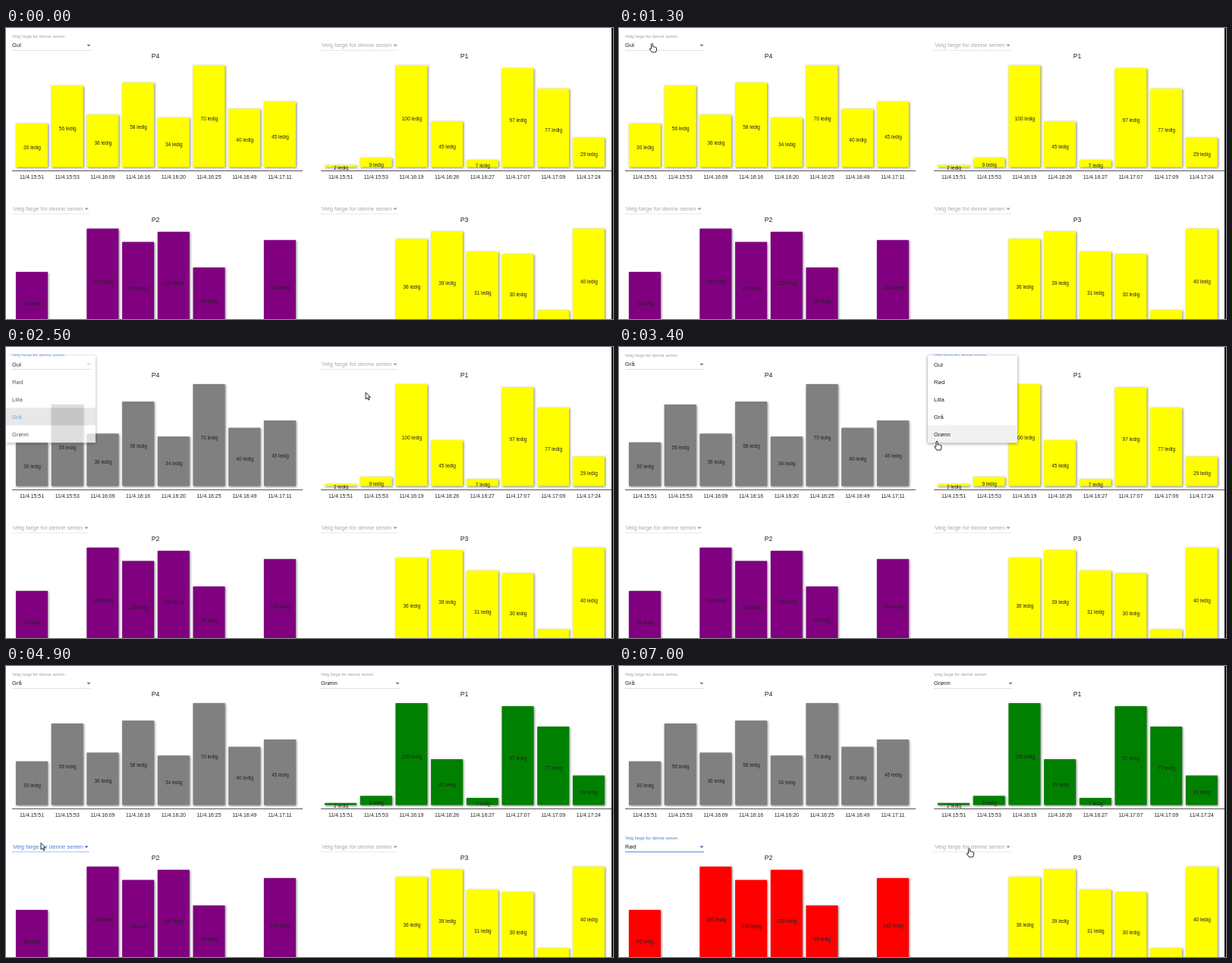
Animation of 800x384 px, one loop 7100 ms. Source, as an HTML page:

```html
<!DOCTYPE html>
<html lang="no">
<head>
<meta charset="utf-8">
<title>Ledige plasser</title>
<style>
  html, body { margin: 0; width: 100%; height: 100%; overflow: hidden; background: #fff; }
  svg { display: block; width: 100vw; height: 100vh; font-family: "Liberation Sans", Arial, sans-serif; }
  .bars rect { filter: drop-shadow(1.3px 1.3px 1.6px rgba(0, 0, 0, .5)); }
  .sheet { filter: drop-shadow(0 1.5px 2px rgba(0, 0, 0, .45)); }
</style>
</head>
<body>
<svg id="stage" viewBox="0 0 800 384"></svg>
<script>
const LOOP = 7100, STEP = 100;
const BLUE = '#3f7fe0', INK = '#222', HINT = 'Velg farge for denne serien';
const COLORS = { Gul: 'yellow', Rød: 'red', Lilla: 'purple', Grå: 'gray', Grønn: 'green' };
const NAMES = Object.keys(COLORS);
const ROW = 23, MENU_TOP = 11.3, MENU_WIDTH = 118;
const BASE = 183.5, BAR_MAX = 134.5, BAR_GAP = 46.7;

// Menus open and are clicked at these times; everything else about them follows.
const PANELS = [
  { title: 'P4', from: 'Gul', to: 'Grå', open: 1500, click: 2100, selected: true,
    values: [30, 56, 36, 58, 34, 70, 40, 45], times: '15:51 15:53 16:09 16:16 16:20 16:25 16:49 17:11' },
  { title: 'P1', from: 'Gul', to: 'Grønn', open: 2900, click: 3600,
    values: [2, 9, 100, 45, 7, 97, 77, 29], times: '15:51 15:53 16:19 16:26 16:27 17:07 17:09 17:24' },
  { title: 'P2', from: 'Lilla', to: 'Rød', open: 5000, click: 6000,
    values: [92, 0, 160, 139, 155, 99, 0, 142] },
  { title: 'P3', from: 'Gul', to: 'Gul', open: Infinity, click: Infinity,
    values: [0, 0, 36, 39, 31, 30, 8, 40] }
];

// The pointer reaches each stop at its time, after a move of at most TRAVEL ms.
const TRAVEL = 500;
const STOPS = [
  { at: 500, x: 800, y: 384 }, { at: 1200, x: 43.5, y: 20 }, { at: 1900, x: 32, y: 92 },
  { at: 2500, x: 474, y: 60 }, { at: 2800, x: 440, y: 21 }, { at: 3300, x: 419, y: 124 },
  { at: 4700, x: 46, y: 233.5 }, { at: 5500, x: 38, y: 266 }, { at: 6800, x: 461.5, y: 240 }
];

const stage = document.getElementById('stage');
const clamp = (v, low, high) => Math.max(low, Math.min(high, v));
const ease = k => k * k * (3 - 2 * k);

function set(node, attrs) {
  for (const key in attrs) node.setAttribute(key, attrs[key]);
}
function add(parent, tag, attrs, content = '') {
  const node = document.createElementNS('http://www.w3.org/2000/svg', tag);
  set(node, attrs);
  node.textContent = content;
  return parent.appendChild(node);
}
// y is the middle of the capitals
function label(parent, content, x, y, size, fill = INK, anchor = 'start') {
  return add(parent, 'text', { x, y: y + size * .36, 'font-size': size, fill, 'text-anchor': anchor }, content);
}
function show(node, visible) {
  node.style.display = visible ? '' : 'none';
}

function buildPanel(panel, index) {
  panel.x = index % 2 * 407;
  panel.y = index < 2 ? 0 : 215.7;
  const g = add(stage, 'g', { transform: `translate(${panel.x} ${panel.y})` });
  panel.bars = add(g, 'g', { class: 'bars' });
  const peak = Math.max(...panel.values);
  const times = panel.times ? panel.times.split(' ') : [];
  panel.values.forEach((value, i) => {
    if (!value) return;
    const x = 13 + i * BAR_GAP, height = BAR_MAX * value / peak;
    add(panel.bars, 'rect', { x, y: BASE - height, width: 42, height });
    label(g, value + ' ledig', x + 21.5, BASE - height / 2 + 3, 6.5, INK, 'middle');
  });
  times.forEach((time, i) => label(g, '11/4.' + time, 34 + i * BAR_GAP, 197, 6.9, INK, 'middle'));
  add(g, 'rect', { x: 8, y: 188, width: 383, height: 1, fill: '#555' });
  label(g, panel.title, 197, 37.2, 8.7, INK, 'middle');

  panel.hint = label(g, HINT, 9, 22.5, 7.7);
  panel.small = label(g, HINT, 8, 10.8, 5.75);
  panel.value = label(g, '', 8, 22.5, 7.7);
  panel.line = add(g, 'path', { 'stroke-width': 1 });
  panel.arrow = add(g, 'path', { d: 'M-2.6 21.8H2.6L0 24.5Z' });
}

function buildMenu(panel) {
  panel.menu = add(stage, 'g', { transform: `translate(${panel.x} ${panel.y + MENU_TOP})` });
  add(panel.menu, 'rect', { class: 'sheet', width: MENU_WIDTH, height: ROW * NAMES.length, fill: '#fff' });
  panel.mark = add(panel.menu, 'rect', { width: MENU_WIDTH, height: ROW });
  panel.rows = NAMES.map((name, i) => label(panel.menu, name, 8, ROW * (i + .5), 7.7));
}

function pointerAt(t) {
  const next = STOPS.findIndex(stop => stop.at > t);
  if (next < 0) return STOPS[STOPS.length - 1];
  if (next === 0) return null;
  const a = STOPS[next - 1], b = STOPS[next];
  const duration = Math.min(TRAVEL, b.at - a.at);
  const k = ease(clamp(1 - (b.at - t) / duration, 0, 1));
  return { x: a.x + (b.x - a.x) * k, y: a.y + (b.y - a.y) * k };
}

function stateAt(panel, t) {
  const close = panel.click + 500;
  return {
    open: t >= panel.open && t < close,
    clicked: t >= panel.click,
    closed: t >= close,
    fade: clamp((t - panel.click - 200) / 300, 0, 1),
    focused: panel === PANELS.filter(p => t >= p.open - 100).pop()
  };
}

// A hand shows over an idle select box or a menu that awaits its click.
function isClickable(panel, state, { x, y }) {
  const dx = x - panel.x, dy = y - panel.y;
  if (dx < 0 || dx > MENU_WIDTH || dy < 10) return false;
  return state.open ? !state.clicked && dy < 130 : !state.focused && dy < 31;
}

function updatePanel(panel, state, pointer) {
  const hasValue = panel.selected || state.closed, floating = hasValue || state.open;
  const picked = state.clicked ? panel.to : panel.from;

  set(panel.bars, { fill: COLORS[picked] });
  show(panel.hint, !floating);
  show(panel.small, floating);
  show(panel.value, hasValue);
  panel.value.textContent = state.closed ? panel.to : panel.from;
  set(panel.hint, { fill: state.focused ? BLUE : '#a8a8a8' });
  set(panel.small, { fill: state.focused ? BLUE : '#a0a0a0' });
  set(panel.line, {
    d: `M8 29.5H${floating ? 112 : 110}`,
    stroke: state.focused ? BLUE : floating ? '#e0e0e0' : '#d0d0d0',
    'stroke-dasharray': floating ? 'none' : '1 1'
  });
  set(panel.arrow, {
    transform: `translate(${floating ? 109 : 106} 0)`,
    fill: state.focused ? '#4a6fb0' : hasValue ? '#777' : '#999'
  });

  show(panel.menu, state.open);
  if (!state.open) return;
  const hovered = clamp(Math.floor((pointer.y - panel.y - MENU_TOP) / ROW), 0, NAMES.length - 1);
  const row = state.clicked ? NAMES.indexOf(panel.to) : hovered;
  const active = state.clicked || panel.selected ? picked : '';
  set(panel.menu, { opacity: 1 - state.fade * .4 });
  set(panel.mark, { y: row * ROW, fill: state.clicked ? '#e0e0e0' : '#f1f1f1' });
  panel.rows.forEach((node, i) => set(node, { fill: NAMES[i] === active ? '#2f86dc' : INK }));
}

PANELS.forEach(buildPanel);
PANELS.forEach(buildMenu);
add(stage, 'rect', { x: 798, width: 2, height: 384, fill: '#111' });

const outline = { fill: '#fff', stroke: '#111', 'stroke-width': .9, 'stroke-linejoin': 'round' };
const arrow = add(stage, 'path', { ...outline, d: 'M0 0V8.6L2 6.8L3.4 10L5 9.3L3.6 6.2H6.2Z' });
const hand = add(stage, 'path', {
  ...outline,
  d: 'M-1 1Q0 -.8 1 1V5Q2 4.1 2.8 5.2Q3.8 4.5 4.5 5.6Q6 5.1 6 6.8V9L5 12H-.2L-3 8Q-3.3 6.4-1 7.4Z'
});

function draw(t) {
  const pointer = pointerAt(t);
  let clickable = false;
  for (const panel of PANELS) {
    const state = stateAt(panel, t);
    updatePanel(panel, state, pointer);
    clickable ||= !!pointer && isClickable(panel, state, pointer);
  }
  show(arrow, pointer && !clickable);
  show(hand, clickable);
  if (pointer) set(clickable ? hand : arrow, { transform: `translate(${pointer.x} ${pointer.y})` });
}

const began = performance.now();
let drawn = -1;
function tick() {
  const t = Math.floor((performance.now() - began) % LOOP / STEP) * STEP;
  if (t !== drawn) draw(drawn = t);
  requestAnimationFrame(tick);
}
tick();
</script>
</body>
</html>
```
